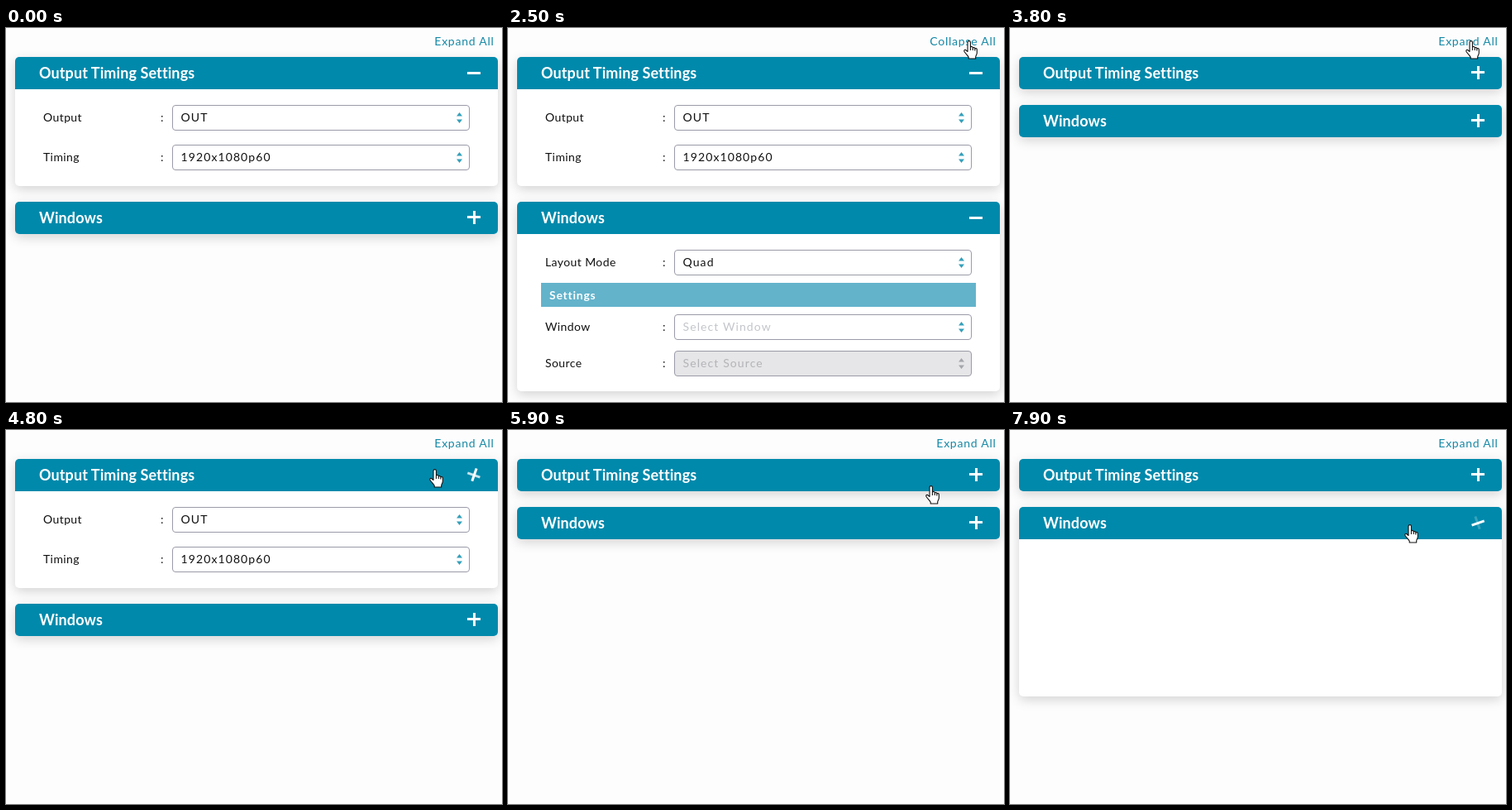
Write an HTML page that moves like this. It is 600 by 452 pixels and loops after 8000 ms.

```html
<!DOCTYPE html>
<html lang="en">
<head>
<meta charset="utf-8">
<title>Output settings accordion</title>
<style>
html, body { margin: 0; width: 100%; height: 100%; overflow: hidden; }
body { position: relative; background: #fefdfe; color: #111; font: 14px/29px Lato, "Open Sans", sans-serif; }
body *, .icon::before, .icon::after { position: absolute; box-sizing: border-box; white-space: nowrap; }
#link { right: 9.5px; top: 1px; color: #1489a6; letter-spacing: .75px; }
.panel { left: 11px; width: 584px; overflow: hidden; background: #fff; border-radius: 5px; box-shadow: 0 4px 14px rgba(0, 0, 0, .17); }
.head { left: 0; top: 0; width: 100%; height: 39px; background: #0089ab; }
.head b { left: 29px; top: 0; font-size: 18px; line-height: 38px; letter-spacing: .1px; color: #fff; }
.icon { left: 547px; top: 10.5px; width: 16px; height: 16px; }
.icon::before, .icon::after { content: ""; background: #fff; }
.icon::before { left: 6.5px; top: 0; width: 3px; height: 16px; }
.icon::after { left: 0; top: 6.5px; width: 16px; height: 3px; opacity: var(--fade); }
.body { left: 0; top: 39px; width: 100%; }
.row { left: 0; width: 100%; height: 31px; }
.row label { left: 34px; top: 0; letter-spacing: .4px; }
.row i { left: 176px; top: 0; font-style: normal; }
.field { left: 189.5px; top: 0; width: 360.5px; height: 31px; padding-left: 10px; line-height: 27px; letter-spacing: 1.1px; border: 1px solid #9a9ba8; border-radius: 4px; color: #111; fill: #35a0ba; }
.field svg { right: 8px; top: 8px; width: 7px; height: 13px; }
.hint { color: #c3c5ca; }
.disabled { color: #b3b4b8; background: #e6e5e7; fill: #a5a6aa; }
.bar { left: 29px; top: 59px; width: 526px; height: 29px; padding-left: 10px; background: #63b3cb; color: #fff; font-weight: bold; letter-spacing: .75px; }
.cursor { left: 0; top: 0; width: 20px; height: 26px; overflow: visible; fill: #fff; stroke: #111; stroke-width: 1.1; stroke-linejoin: round; }
</style>
</head>
<body>
<div id="link"></div>
<script>
const LOOP = 8000, STEP = 100, TOGGLE = 200;
const HEAD = 39, GAP = 19, TOP = 35, MAX_HEIGHT = 600;

const row = (y, label, value, style = "") => `<div class="row" style="top:${y}px"><label>${label}</label><i>:</i>
<div class="field ${style}">${value}<svg><path d="M0 4.5 3.5 0 7 4.5zM0 8.5h7L3.5 13z"/></svg></div></div>`;

// toggles: [time, open], each click starts one transition
const panels = [
  { title: "Output Timing Settings", height: 117, open: true,
    toggles: [[3540, false], [4740, true], [5640, false]],
    rows: row(19, "Output", "OUT") + row(67, "Timing", "1920x1080p60") },
  { title: "Windows", height: 190, open: false,
    toggles: [[2240, true], [3540, false], [6500, true], [7840, false]],
    rows: row(19, "Layout Mode", "Quad") + '<div class="bar">Settings</div>' +
      row(97, "Window", "Select Window", "hint") + row(141, "Source", "Select Source", "disabled") },
];

// cursor waypoints: [time, x, y]
const path = [
  [1400, 574, 106], [1800, 557, 40], [2000, 551, 15], [2100, 558, 16],
  [4300, 558, 16], [4700, 519, 48], [5700, 519, 48], [5900, 512, 68], [6500, 484, 115], [LOOP, 484, 115],
];

for (const p of panels) {
  p.el = document.createElement("div");
  p.el.className = "panel";
  p.el.innerHTML = `<div class="body">${p.rows}</div><div class="head"><b>${p.title}</b><div class="icon"></div></div>`;
  p.body = p.el.querySelector(".body");
  p.icon = p.el.querySelector(".icon");
  document.body.append(p.el);
}
document.body.insertAdjacentHTML("beforeend", `
<svg class="cursor" id="arrow"><path d="M.5.5v16l3.8-3.5 2.6 5.8 2.4-1-2.6-5.8h5z"/></svg>
<svg class="cursor" id="hand"><path d="M5 13.5V2.3a1.7 1.7 0 0 1 3.4 0V8.2a1.5 1.5 0 0 1 2.8.5v.6a1.4 1.4 0 0 1 2.6.4v.7a1.3 1.3 0 0 1 2.5.3V15c0 2-1.6 3.6-1.6 5v2H6.2v-1.8C5 18 2 15.5.9 13.2c-.6-1.6 1.2-2.4 2.3-1.2zM8.4 8.5v3.5M11.2 9.3v2.8M13.8 10.4v2"/></svg>`);

const [link, arrow, hand] = ["link", "arrow", "hand"].map(id => document.getElementById(id));
const smooth = u => u * u * (3 - 2 * u);

function panelState(p, t) {
  const last = p.toggles.filter(([start]) => start < t).pop();
  if (!last) return { open: p.open, amount: +p.open };
  const u = smooth(Math.min(1, (t - last[0]) / TOGGLE));
  return { open: last[1], amount: last[1] ? u : 1 - u };
}

function drawPanels(t) {
  let y = TOP;
  for (const p of panels) {
    const { open, amount } = panelState(p, t);
    const height = HEAD + Math.min(p.height, MAX_HEIGHT * amount);
    p.y = y;
    p.el.style.top = y + "px";
    p.el.style.height = height + "px";
    p.body.style.visibility = open ? "visible" : "hidden";
    p.icon.style.transform = `rotate(${90 * amount}deg)`;
    p.icon.style.setProperty("--fade", 1 - amount);
    y += height + GAP;
  }
}

function drawCursor(t) {
  const visible = t >= path[0][0];
  const k = Math.max(1, path.findIndex(([time]) => time > t));
  const [t0, x0, y0] = path[k - 1], [t1, x1, y1] = path[k];
  const u = (t - t0) / (t1 - t0);
  const x = x0 + (x1 - x0) * u, y = y0 + (y1 - y0) * u;
  const overLink = x > 509 && x < 591 && y > 6 && y < 26;
  const overHead = panels.some(p => y >= p.y && y <= p.y + HEAD);
  const pointing = overLink || overHead;
  arrow.style.display = visible && !pointing ? "block" : "none";
  hand.style.display = visible && pointing ? "block" : "none";
  arrow.style.transform = `translate(${x}px, ${y}px)`;
  hand.style.transform = `translate(${x - 7}px, ${y - 1}px)`;
}

function draw(now) {
  const t = Math.floor((now % LOOP) / STEP) * STEP;
  link.textContent = t > 2240 && t < 3540 ? "Collapse All" : "Expand All";
  drawPanels(t);
  drawCursor(t);
}

const start = performance.now();
function tick() {
  draw(performance.now() - start);
  requestAnimationFrame(tick);
}
tick();
</script>
</body>
</html>
```
